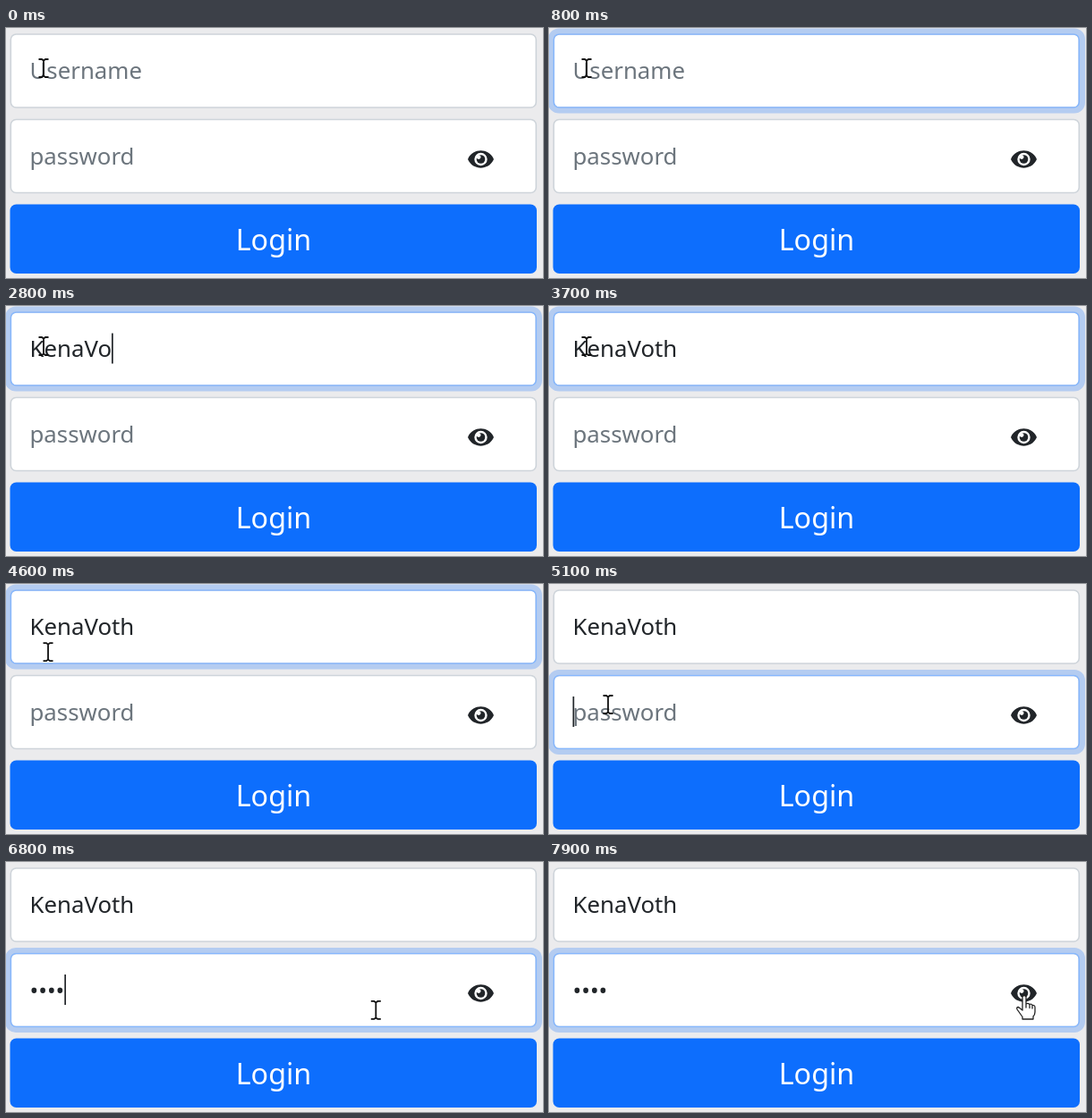
Animation of 600 by 280 pixels, one loop 8 s. Source, as an HTML page:

```html
<!DOCTYPE html>
<html lang="en">
<head>
<meta charset="utf-8">
<title>Login form</title>
<style>
  html, body { margin: 0; width: 100%; height: 100%; overflow: hidden; background: #ebebed; }
  svg { display: block; }
  text { font: 25.8px "Noto Sans", "Open Sans", sans-serif; white-space: pre; }
  .box { fill: #fff; stroke: #ced4da; stroke-width: 1.6; }
  .glow { fill: #b4ccf1; }
  .edge { fill: none; stroke: #86b7fe; stroke-width: 1.6; }
  .hint { fill: #6c757d; }
  .value, .caret, .dark { fill: #212529; }
  .login { font-size: 32.3px; fill: #fff; text-anchor: middle; }
  .beam { fill: none; stroke: #111; stroke-width: 1.8; }
  .hand { fill: #fff; stroke: #222; stroke-width: 1.3; stroke-linejoin: round; stroke-linecap: round; }
</style>
</head>
<body>
<svg width="600" height="280" viewBox="0 0 600 280">
  <g id="fields"></g>
  <rect x="4.5" y="197.5" width="588.5" height="77.5" rx="7" fill="#0d6efd"/>
  <text class="login" x="299" y="249">Login</text>
  <g transform="translate(530.5 147)">
    <path class="dark" d="M-14.2-.8C-8.5-12.6 8.5-12.6 14.2-.8Q14.6 0 14.2.8C8.5 12.6-8.5 12.6-14.2.8Q-14.6 0-14.2-.8Z"/>
    <circle r="7.2" fill="#fff"/>
    <circle class="dark" r="4.8"/>
    <circle cx="-2.4" cy="-2.4" r="2.4" fill="#fff"/>
  </g>
  <path id="beam" class="beam" d="M-5.5-10H-2L0-8.5L2-10H5.5M0-8.5V8.5M-5.5 10H-2L0 8.5L2 10H5.5"/>
  <path id="hand" class="hand" d="M-2 2Q0-1 2 2V10Q4 8.5 6 10.5Q8 9.5 9 11.5Q12 11 12 14V19Q12 22 10 24V27H-2V24.5L-8 16Q-9 13.5-6.5 13.5L-2 17ZM2 10V14M6 10.5V14.5M9 11.5V15"/>
</svg>
<script>
const LOOP = 8000, FADE = 150, BLINK = 500, LEFT = 26.5;
const $ = id => document.getElementById(id);

const fields = [
  { y: 7, hint: "Username", value: "KenaVoth", focus: 250, blur: 4900,
    keys: [1250, 1550, 1850, 2150, 2450, 2700, 2900, 3100] },
  { y: 102.5, hint: "password", value: "••••", focus: 4900, blur: Infinity,
    keys: [5700, 5950, 6200, 6400] }
];

// time, x, y
const path = [
  [0, 42, 45], [4100, 42, 45], [4600, 47, 76], [5100, 66, 135],
  [6400, 66, 135], [6800, 413, 166], [7200, 531, 149], [LOOP, 531, 149]
];

for (const f of fields) {
  const g = document.createElementNS("http://www.w3.org/2000/svg", "g");
  $("fields").append(g);
  g.innerHTML = `
    <rect class="glow" x="-1" y="${f.y - 6.5}" width="600" height="95" rx="12"/>
    <rect class="box" x="5.3" y="${f.y}" width="587" height="82" rx="6"/>
    <rect class="edge" x="5.3" y="${f.y}" width="587" height="82" rx="6"/>
    <text class="hint" x="${LEFT}" y="${f.y + 50}">${f.hint}</text>
    <text class="value" x="${LEFT}" y="${f.y + 50}"></text>
    <rect class="caret" y="${f.y + 23.5}" width="1.7" height="34"/>`;
  for (const part of ["glow", "edge", "hint", "value", "caret"])
    f[part + "El"] = g.querySelector("." + part);
}

const clamp = v => Math.max(0, Math.min(1, v));

function drawField(f, t) {
  const glow = clamp((t - f.focus) / FADE) - clamp((t - f.blur) / FADE);
  f.glowEl.style.opacity = f.edgeEl.style.opacity = glow;

  const typed = f.keys.filter(k => k <= t);
  const text = f.value.slice(0, typed.length);
  if (f.valueEl.textContent !== text) f.valueEl.textContent = text;
  f.hintEl.style.opacity = text ? 0 : 1;

  const since = t - (typed.at(-1) ?? f.focus);
  const on = t >= f.focus && t < f.blur && since % (2 * BLINK) < BLINK;
  f.caretEl.style.opacity = on ? 1 : 0;
  f.caretEl.setAttribute("x", LEFT + (text ? f.valueEl.getComputedTextLength() : 0));
}

function drawPointer(t) {
  const i = path.findIndex(p => p[0] > t);
  const [t0, x0, y0] = path[i - 1], [t1, x1, y1] = path[i];
  const k = (t - t0) / (t1 - t0);
  const x = x0 + (x1 - x0) * k, y = y0 + (y1 - y0) * k;
  const overEye = x > 516;
  $("beam").style.opacity = overEye ? 0 : 1;
  $("hand").style.opacity = overEye ? 1 : 0;
  for (const id of ["beam", "hand"]) $(id).setAttribute("transform", `translate(${x} ${y})`);
}

function frame() {
  const t = performance.now() % LOOP;
  fields.forEach(f => drawField(f, t));
  drawPointer(t);
  requestAnimationFrame(frame);
}
frame();
</script>
</body>
</html>
```
